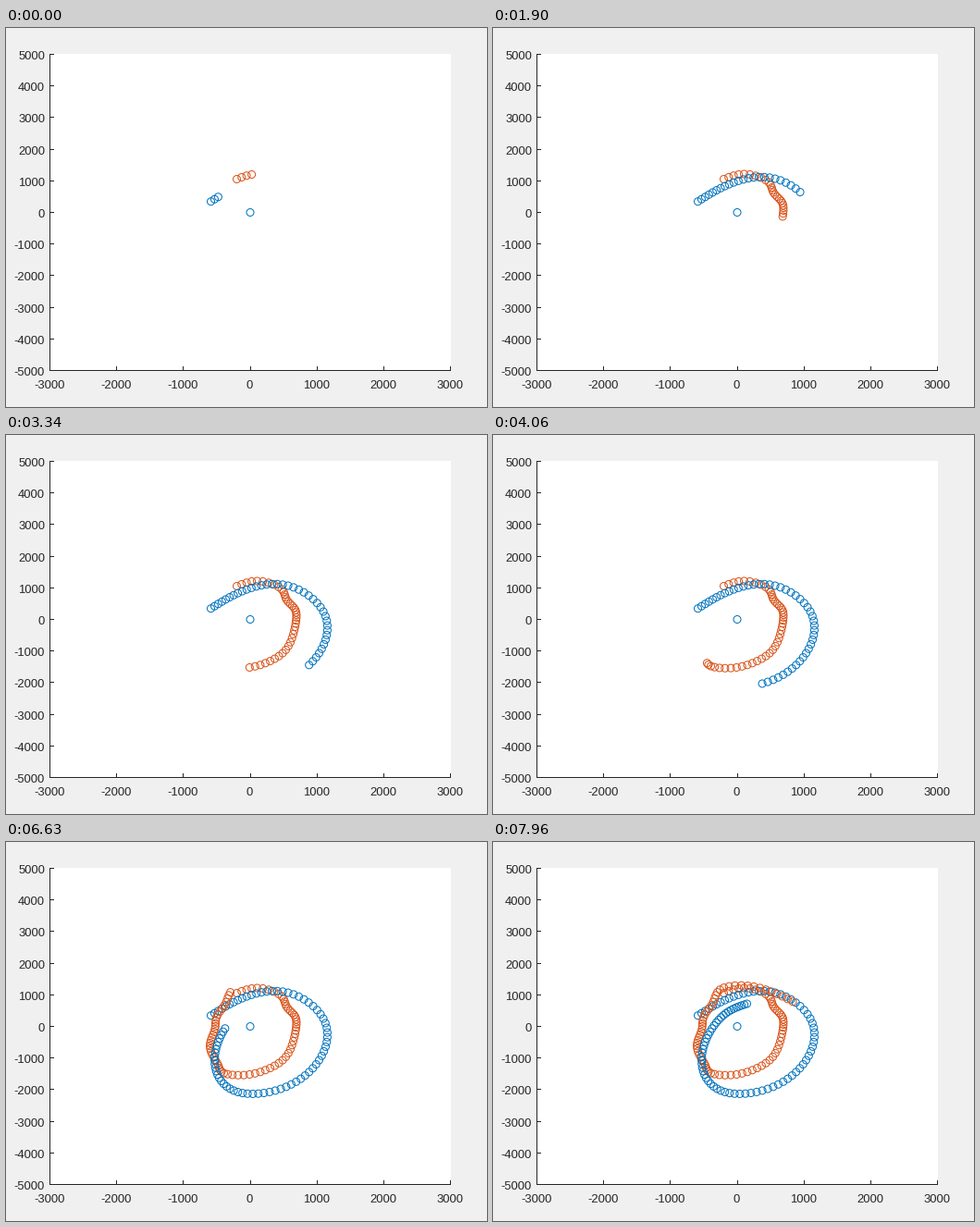
Write a matplotlib script that moves like this. It is 520x410 px and loops after 8000 ms.

```python
import numpy as np
import matplotlib.pyplot as plt
from matplotlib.animation import FuncAnimation
from matplotlib.patches import Rectangle

W, H, DPI = 520, 410, 80
PT = 72 / DPI                       # points per pixel
LOOP, TICK = 8000, 20               # ms
INK, BLUE, RED = "#262626", "#0072bd", "#d95319"
LEFT, RIGHT, TOP, BOTTOM = 47.5, 480.5, 28.5, 370.5

# New points come at an even pace
STEPS = np.linspace(80, 7960, 83)

# Key places along each track, evenly spaced in time, in pixels
BLUE_KEYS = [
    (221.5, 187.7), (257.7, 168.1), (305, 163), (344.3, 193.5), (338.5, 236),
    (300, 266), (250.7, 270.5), (226.7, 246), (231, 212.5), (250.5, 186.3),
    (274.5, 175),
]
RED_KEYS = [
    (249.5, 163.5), (273.3, 158), (297, 166), (303, 177.6), (311.8, 187.5),
    (313.8, 199), (310.8, 214.6), (302.2, 232.8), (283.5, 245.5), (259, 252),
    (235.5, 250), (229.3, 241.2), (222, 227.8), (221.4, 214.8), (226, 201.8),
    (228, 188.5), (237.8, 173.8), (245.7, 159.5), (271.2, 155.2),
    (299.2, 161.2), (324, 172.7),
]


def track(keys, count):
    """Natural cubic spline through the keys, sampled at count points."""
    p = np.array(keys)
    n = len(p)
    system = 4 * np.eye(n) + np.eye(n, k=1) + np.eye(n, k=-1)
    system[0, 0] = system[-1, -1] = 2
    padded = np.vstack([p[:1], p, p[-1:]])
    slope = np.linalg.solve(system, 3 * (padded[2:] - padded[:-2]))
    t = np.linspace(0, n - 1, count)
    i = np.minimum(t.astype(int), n - 2)
    u = (t - i)[:, None]
    v = 1 - u
    return (v * v * ((1 + 2 * u) * p[i] + u * slope[i])
            + u * u * ((1 + 2 * v) * p[i + 1] - v * slope[i + 1]))


def px(value):
    return LEFT + (value + 3000) / 6000 * (RIGHT - LEFT)


def py(value):
    return TOP + (5000 - value) / 10000 * (BOTTOM - TOP)


def crisp(value):
    return np.floor(value) + 0.5


def line(xs, ys):
    ax.plot(xs, ys, color=INK, lw=PT, solid_capstyle="butt",
            snap=False, zorder=2)


def label(x, y, value, align):
    ax.text(x, y, str(value), ha=align, va="baseline", color=INK,
            family="Liberation Sans", size=13 * PT)


fig = plt.figure(figsize=(W / DPI, H / DPI), dpi=DPI, facecolor="#f0f0f0")
ax = fig.add_axes([0, 0, 1, 1])
ax.axis("off")
ax.add_patch(Rectangle((47, 28), 434, 343, fc="white", lw=0))
line([LEFT, LEFT], [28, 371])
line([47, 481], [BOTTOM, BOTTOM])
for v in range(-3000, 3001, 1000):
    line([crisp(px(v))] * 2, [BOTTOM, BOTTOM - 4.5])
    label(px(v) - 0.5, 390, v, "center")
for v in range(-5000, 5001, 1000):
    line([LEFT, LEFT + 4.5], [crisp(py(v))] * 2)
    label(42, py(v) + 5.5, v, "right")
ax.set_xlim(0, W)
ax.set_ylim(H, 0)

# The origin and first red point, then blue and red in turn
blue = track(BLUE_KEYS, len(STEPS) + 3)
red = track(RED_KEYS, len(STEPS) + 4)
pairs = np.stack([blue, red[1:]], axis=1).reshape(-1, 2)
points = np.vstack([(px(0), py(0)), red[0], pairs])
colors = [BLUE, RED] * (len(points) // 2)
dots = ax.scatter([], [], s=(8 * PT) ** 2, facecolors="none",
                  linewidths=PT, zorder=3)


def draw(frame):
    done = np.count_nonzero(STEPS <= frame * TICK + TICK / 2)
    count = 2 * (done + 4)
    dots.set_offsets(points[:count])
    dots.set_edgecolors(colors[:count])
    return [dots]


anim = FuncAnimation(fig, draw, frames=LOOP // TICK, interval=TICK,
                     repeat=True, repeat_delay=0)
plt.show()
```
